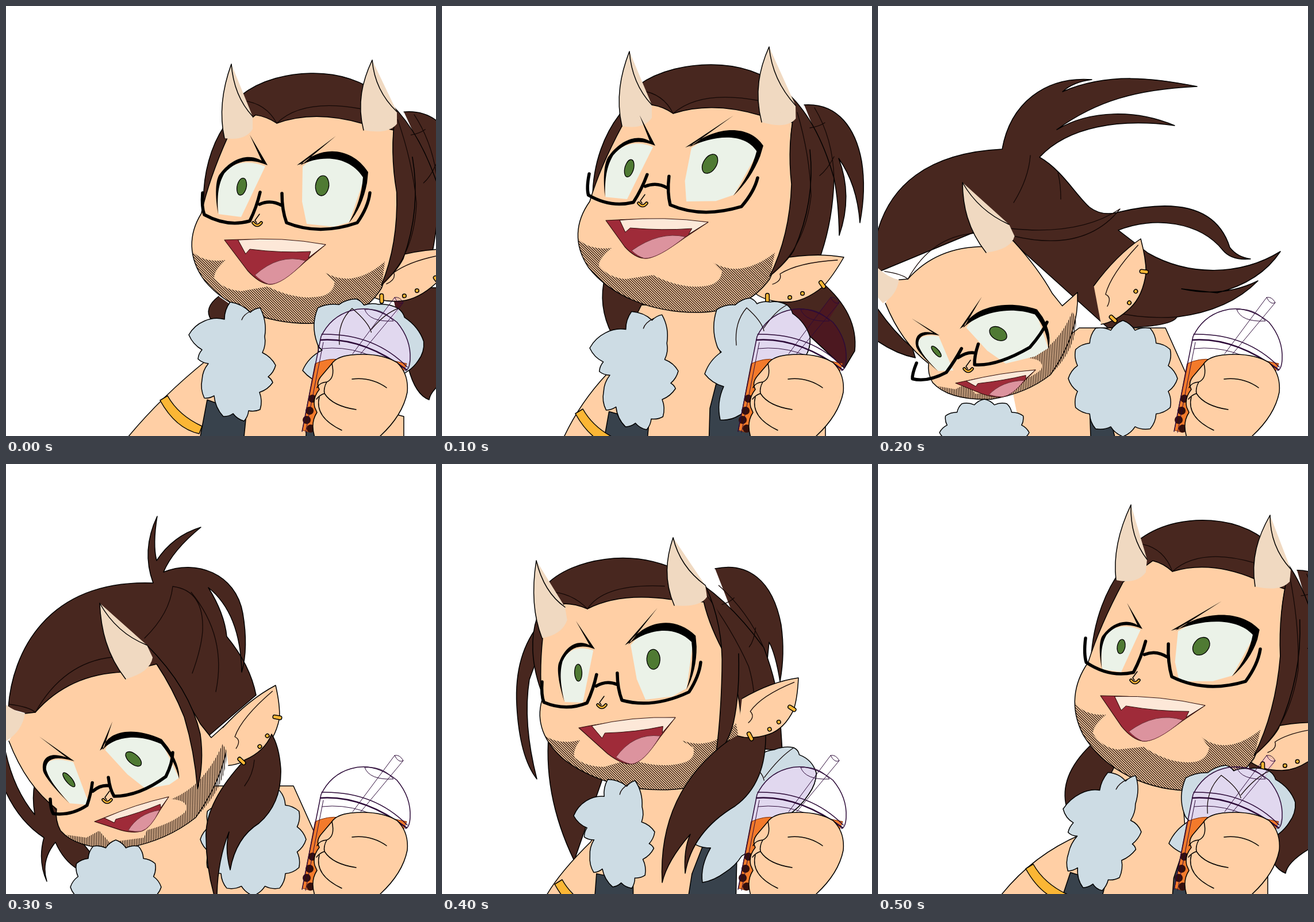
Animation, 748 px wide and 748 px high, one loop 0.6 s. Source, as an HTML page with a canvas:

```html
<!DOCTYPE html>
<html lang="en">
<head>
<meta charset="utf-8">
<title>Bubble tea</title>
<style>
html, body { margin: 0; width: 100%; height: 100%; overflow: hidden; background: #fff }
canvas { display: block; width: 100vw; height: 100vh }
</style>
</head>
<body>
<canvas width="748" height="748"></canvas>
<script>
const c = document.querySelector('canvas').getContext('2d');
const gold = '#fbb635', horn = '#f0d9c1', white = '#ebf2e8', green = '#4f7a33', tea = '#f37a2b';
const plain = { hair: '#48271f', skin: '#ffcfa5', fur: '#cddce4', vest: '#38424c' };
const tinted = { hair: '#4c1820', skin: '#fdc9c0', fur: '#e1d8ef', vest: '#30303f' };
let ink = plain;

// Every part is drawn once and placed in each pose by three anchor points.
const back = {
  head: [471, 204, 622, 216, 455, 488], ear: [686, 434, 786, 424, 688, 513],
  horns: [[392, 101, 380, 230, 429, 192], [637, 94, 622, 216, 680, 184]],
  left: [455, 277, 371, 293, 409, 367], right: [516, 278, 628, 293, 523, 379],
  glass: [342, 325, 633, 325, 488, 377], mouth: [380, 407, 556, 415, 457, 484], nose: [437, 379],
  collar: [318, 572, 469, 625, 414, 722], fur: [516, 634, 545, 715, 648, 519],
  arm: [212, 270, 680, 692], band: [0, 0], nape: [370, 505, 357, 546], low: [0, 0], tilt: -.8
};
const turn = {
  head: [402, 187, 556, 202, 367, 468], ear: [600, 438, 699, 437, 600, 515],
  horns: [[326, 79, 313, 209, 365, 172], [569, 71, 556, 202, 615, 173]],
  left: [371, 243, 289, 262, 322, 336], right: [434, 246, 556, 247, 425, 340],
  glass: [256, 292, 549, 299, 397, 346], mouth: [285, 373, 463, 376, 352, 439], nose: [349, 345],
  collar: [257, 595, 411, 635, 356, 737], fur: [457, 640, 484, 720, 570, 515],
  arm: [212, 240, 690, 667], band: [-36, 23], nape: [284, 470, 296, 572], tilt: -.8
};
const dive = {
  lean: [52, 475, 188, 429, 95, 655], ear: [385, 475, 457, 405, 439, 525],
  horns: [[147, 307, 188, 429, 228, 380]],
  left: [107, 573, 66, 592, 131, 634], right: [153, 559, 277, 531, 222, 622],
  glass: [67, 621, 294, 550, 168, 624], mouth: [135, 656, 274, 633, 216, 680], nose: [157, 633],
  ruffs: [[426, 648, 95, 101], [185, 742, 78, 58]], tilt: -.05, hair: flying
};
const land = {
  lean: [51, 432, 208, 374, 95, 638], ear: [388, 448, 469, 385, 443, 500],
  horns: [[163, 242, 208, 374, 245, 315]],
  left: [119, 517, 64, 533, 145, 593], right: [172, 497, 272, 482, 243, 565],
  glass: [77, 583, 290, 502, 188, 578], mouth: [154, 622, 283, 579, 235, 639], nose: [176, 586],
  ruffs: [[430, 653, 92, 98], [191, 736, 79, 82]], tilt: -.02, hair: falling, over: droop
};
const rise = {
  head: [253, 252, 404, 246, 326, 514], ear: [534, 402, 620, 372, 569, 470],
  horns: [[164, 168, 174, 303, 214, 249], [402, 128, 404, 246, 458, 211]],
  left: [266, 322, 203, 346, 245, 415], right: [328, 314, 440, 303, 354, 410],
  glass: [174, 379, 450, 345, 313, 411], mouth: [238, 459, 406, 441, 329, 522], nose: [278, 421],
  collar: [229, 612, 370, 640, 330, 738], fur: [432, 655, 453, 728, 578, 497],
  arm: [182, 205, 710, 650], band: [-72, 45], nape: [187, 455, 230, 690], tilt: -.8,
  hair: strand, over: locks
};
const top_ = {
  head: [512, 187, 657, 213, 462, 492], ear: [702, 455, 800, 453, 703, 533],
  horns: [[440, 71, 414, 202, 468, 166], [682, 89, 656, 213, 718, 183]],
  left: [460, 287, 390, 299, 423, 362], right: [522, 290, 661, 292, 524, 378],
  glass: [361, 303, 665, 322, 511, 370], mouth: [387, 403, 569, 420, 460, 482], nose: [447, 378],
  collar: [322, 600, 458, 640, 390, 742], fur: [506, 660, 535, 740, 645, 530],
  arm: [214, 270, 680, 678], band: [-11, 18], nape: [369, 490, 328, 597], low: [-27, 27], tilt: -.8
};
const poses = [back, turn, dive, land, rise, top_];

const basis = ([x, y, ax, ay, bx, by]) => new DOMMatrix([ax - x, ay - y, bx - x, by - y, x, y]);
const fit = (from, to) => basis(to).multiply(basis(from).inverse());
const shift = ([x, y]) => new DOMMatrix().translate(x, y);

function place(d, matrix) {
  const p = new Path2D();
  p.addPath(new Path2D(d), matrix);
  return p;
}

function draw(d, fill, matrix, line = '#000', width = 1.5) {
  const p = place(d, matrix);
  c.lineWidth = width;
  if (fill) { c.fillStyle = fill; c.fill(p); }
  if (line) { c.strokeStyle = line; c.stroke(p); }
}
const hair = (d, m) => draw(d, ink.hair, m);
const skin = (d, m) => draw(d, ink.skin, m);
const lines = (d, m) => draw(d, null, m, '#140806', 1.3);

function goldLine(d, m, width = 5) {
  draw(d, null, m, '#000', width + 3);
  draw(d, null, m, gold, width);
}

// Clockwise points joined by curves that bulge outwards.
function tufts(points, matrix) {
  const n = points.length;
  let d = `M${points[0]} ${points[1]}`;
  for (let i = 0; i < n; i += 2) {
    const x = points[i], y = points[i + 1], u = points[(i + 2) % n], v = points[(i + 3) % n];
    d += `Q${(x + u) / 2 + (v - y) * .17} ${(y + v) / 2 - (u - x) * .17} ${u} ${v}`;
  }
  draw(d, ink.fur, matrix);
}

function ruff([x, y, rx, ry]) {
  const points = [];
  for (let i = 0; i < 24; i++) {
    const a = (i - 6) * Math.PI / 12, k = i % 2 ? .86 : 1;
    points.push(x + rx * k * Math.cos(a), y + ry * k * Math.sin(a));
  }
  tufts(points);
}

function stubble(d, matrix, angle) {
  c.save();
  c.clip(place(d, matrix));
  c.translate(374, 374);
  c.rotate(angle);
  let rows = '';
  for (let x = -600; x < 600; x += 3) rows += `M${x} -600V600`;
  draw(rows, null, undefined, '#20130c', 1.3);
  c.restore();
}

function ear(p) {
  const m = fit(turn.ear, p.ear);
  skin('M585 440Q650 428 699 437Q680 470 663 488Q630 515 600 515Q565 515 545 500', m);
  lines('M575 484Q592 478 588 466Q620 446 688 442', m);
  return m;
}
const rings = m => goldLine('M566 503v10M605 507h.1M627 500h.1M659 481l5 7', m);

function upright(p) {
  const m = fit(turn.head, p.head), l = fit(back.collar, p.collar), r = fit(turn.fur, p.fur);
  const [x, y] = p.collar, [u, v] = p.fur, [ax, ay, tx, ty] = p.nape, [foot, bx, by, edge] = p.arm;
  if (p.hair) p.hair();
  else hair('M630 172C690 168 720 215 730 270Q738 320 727 377Q722 310 690 265Q715 330 691 399Q690 340 682 300', m);
  hair('M262 335C262 270 285 220 308 190L341 138C380 110 430 102 468 102C560 102 640 150 682 300Q680 370 660 430L640 490L300 400', m);
  hair(`M${ax} ${ay}Q${Math.min(ax, tx) - 14} ${(ay + ty) / 2} ${tx} ${ty}L${ax + 100} ${ay + 70}`);
  if (p.low) hair('M670 490H800V630Q740 660 736 685Q712 676 700 630', shift(p.low));
  else if (!p.over) hair('M660 480Q725 535 718 600L700 630L560 500');

  skin(`M${foot} 750Q${bx} ${by} ${x + 30} ${y + 45}L${x + 90} ${y - 75}H${u + 20}L${u + 30} ${v}V750`);
  skin(`M540 750L600 690L${edge} 714V750`);
  draw('M334 770L350 685L418 710L412 770', ink.vest, l);
  draw('M480 645L466 700L464 770H540L530 660', ink.vest, r);
  draw('M268 686L281 678Q300 712 341 731L336 744Q295 735 268 686', gold, shift(p.band));

  const e = p.over ? null : ear(p);
  skin('M313 209L365 172Q385 175 402 187Q470 165 553 190L610 203Q602 250 610 310Q610 390 570 475Q530 530 450 533C360 535 290 500 255 455C228 415 232 375 257 340Q275 280 313 209', m);
  stubble('M237 405Q255 425 295 421Q272 440 273 452Q290 473 320 475L367 468Q420 495 465 486Q485 480 487 462L471 446Q520 475 579 429L570 475Q530 530 450 533C360 535 290 500 255 455Q238 430 237 405', m, p.tilt);
  if (e) {
    hair('M615 173Q600 240 608 310Q605 400 570 470Q600 445 612 425Q650 340 640 250', m);
    rings(e);
  }
  lines('M402 187Q385 152 345 147M402 187Q450 145 553 165M618 185Q640 260 642 330Q632 420 572 468M640 212Q655 210 666 203M657 295Q670 285 682 262M648 177Q680 230 682 300', m);
  tufts([380, 545, 390, 515, 425, 533, 442, 525, 450, 575, 446, 603, 469, 625, 456, 645, 464, 655, 441, 672, 442, 702,
    422, 704, 414, 722, 395, 709, 378, 714, 362, 678, 345, 682, 341, 650, 352, 622, 334, 614, 341, 598, 318, 572, 345, 548], l);
  lines('M410 546Q413 536 428 530', l);
  tufts([478, 528, 510, 520, 536, 508, 548, 518, 570, 515, 600, 520, 610, 535, 640, 575, 632, 610, 600, 640,
    540, 690, 517, 712, 484, 720, 490, 662, 457, 640, 486, 602, 478, 590], r);
  lines('M512 590Q508 550 530 525Q556 548 560 565M560 560Q580 530 600 520', r);
  if (p.over) {
    p.over();
    rings(ear(p));
  }
}

function strand() {
  hair('M172 275Q125 330 130 420Q135 510 165 548Q140 450 152 375L175 312');
  hair('M475 182C530 170 575 200 590 280Q597 330 588 378Q580 330 569 310L560 400');
}

function locks() {
  hair('M458 211Q490 280 487 360Q485 450 475 515Q500 480 507 450Q518 400 516 330');
  hair('M500 480Q375 570 383 728Q392 690 432 644Q420 670 423 712Q435 640 510 595Q565 555 563 467L518 470');
}

function leaning(p) {
  const m = fit(land.lean, p.lean);
  p.hair();
  skin('M230 650L350 560H500L545 660V750H250');
  if (p == dive) draw('M368 695L370 750H412L400 700', ink.vest);
  skin('M33 434L51 432Q110 365 205 362L262 348Q310 400 338 452L357 476L388 448Q390 530 330 615Q280 655 210 668C140 672 110 655 95 638Q85 620 88 600Q35 560 5 482', m);
  stubble('M377 487Q345 560 288 583Q320 585 312 605Q290 625 245 637L240 650L180 658L162 638L140 650L105 645Q140 675 210 668Q280 655 330 615Q385 560 384 500', m, p.tilt);
  lines('M51 432Q40 422 5 418M51 432Q100 345 185 336', m);
  draw('M-10 410Q10 430 33 434Q28 465 0 482L-10 470', horn, m, null);
  if (p == land) hair('M245 315Q320 390 338 470Q345 520 333 565Q328 500 310 440Q290 390 262 348');
  const e = ear(p);
  p.ruffs.forEach(ruff);
  if (p.over) p.over();
  rings(e);
}

function flying() {
  hair('M-5 410C15 310 90 255 216 249C230 170 290 122 372 128Q340 132 321 149C400 115 480 125 555 140C450 145 380 165 311 215C370 180 450 180 516 208C420 195 330 210 281 263C320 285 345 330 368 350Q390 367 421 358C520 335 590 350 612 420Q625 437 648 440Q615 443 600 425C560 375 480 365 418 390L470 430C540 470 630 470 700 427Q665 480 590 499L528 492Q600 508 661 478Q610 530 520 541Q510 560 400 560L200 380L-5 465');
  hair('M-5 520Q25 565 60 595L65 612Q30 605 -5 580');
  lines('M265 260Q262 300 236 342M313 290Q318 310 318 336M421 353Q350 400 230 387M421 353Q360 430 235 400M410 532Q460 545 520 541');
}

function falling() {
  hair('M4 425C10 330 70 200 256 207Q235 150 263 91Q255 140 262 168Q290 125 339 110Q290 150 274 188C330 165 400 190 412 260Q422 320 410 362Q408 260 352 215Q380 260 384 300Q425 350 435 402L350 475L40 435');
  hair('M-5 478Q8 560 50 610Q45 580 50 555L150 680L125 705Q100 690 86 658Q60 690 71 726Q55 690 66 650Q20 620 -5 560');
  lines('M290 213Q285 260 241 303M290 213Q345 220 342 290Q340 320 324 364M322 223Q385 300 365 396');
}

function droop() {
  hair('M415 515Q345 590 348 650Q348 700 362 750H367Q368 690 388 640Q380 670 390 706Q400 650 440 625Q480 590 478 530Q475 490 462 470Q450 500 415 515');
  lines('M432 515Q430 540 415 560');
}

function features(p) {
  for (const h of p.horns) {
    const m = fit(back.horns[1], h);
    draw('M622 216Q665 224 680 205V184L637 94', horn, m, null);
    draw('M622 216C610 170 620 130 637 94C640 130 655 160 680 184', horn, m);
  }
  const l = fit(back.left, p.left), r = fit(back.right, p.right);
  draw('M370 362C366 330 370 300 380 288Q410 262 451 279L409 367', white, l, null);
  draw('M369 362C362 320 366 298 373 291C395 262 430 252 455 277C425 264 400 268 380 291C369 310 367 330 369 362M424 224L455 277L447 274', '#000', l, null);
  draw('M407.8 329a8 15 12 1 1 .1 0', green, l, '#000', 1.3);
  draw('M516 279L515 340L523 379L570 384L597 376L626 292Q570 235 516 279', white, r, null);
  draw('M512 277C545 243 600 243 630 289L628 308Q620 350 596 378Q618 340 621 298C595 258 545 260 512 277M574 226L506 277L518 273', '#000', r, null);
  draw('M548.6 330a11.5 17.5 8 1 1 .1 0', green, r, '#000', 1.3);

  const m = fit(back.mouth, p.mouth);
  draw('M380 407Q470 403 556 415L520 445Q475 487 457 484Q440 482 420 460Z', '#9f2b39', m, '#30100c', 1.2);
  draw('M433 468Q475 430 521 443Q480 486 457 484Q445 480 433 468', '#dc939e', m, '#6c3038', 1);
  draw('M404 407Q480 401 556 415L526 438L530 427Q480 430 424 423L417 431Z', '#fde8d8', m, '#30100c', 1);

  const nose = shift(p.nose);
  draw('M4 -17l-8 11l3 4', null, nose);
  goldLine('M-7 -2q7 9 14 0', nose, 2.5);
  draw('M342 325Q340 350 345 363Q385 385 424 374Q436 350 442 324M441 345Q460 336 480 347M480 326Q480 355 488 377Q545 400 611 377Q630 350 633 325',
    null, fit(back.glass, p.glass), '#000', 5.5);
}

const cup = 'M515 740L548 575Q565 540 600 530Q640 518 680 550Q705 580 703 615L695 634L680 640H560ZM676 507L691 516L670 550L646 545Z';

function drink() {
  const edge = '#2c0a38';
  draw('M538 622Q560 612 580 615L550 690L530 742L516 738ZM672 617L697 622L690 640Z', tea, undefined, '#7a2c08', 1);
  draw('M533 683h.1M528 704h.1M523 720h.1M530 735h.1', null, undefined, '#35100c', 14);
  draw('M603 605L676 507Q685 505 691 516L617 605M691 516Q683 521 676 507M624 528Q632 550 674 548Q655 525 624 528M552 585L521 742M550 596Q620 588 690 640', null, undefined, edge, 1);
  draw('M515 740L548 575Q565 540 600 530Q640 518 680 550Q705 580 703 615Q702 632 695 634M549 571Q640 569 698 628', null, undefined, edge);
  draw('M547 581Q620 576 697 633', null, undefined, edge, 2.5);
}

function hand() {
  draw('M651 748Q690 712 698 672Q701 640 680 620Q650 602 600 607Q575 610 567 622L550 642Q538 655 545 667Q533 682 537 698L541 707Q529 725 537 750', plain.skin);
  draw('M567 622Q573 648 558 654Q545 655 541 664M558 654Q552 665 554 674Q568 696 609 702M554 674Q545 677 540 684M545 680Q536 715 584 738M602 649Q635 645 662 664', null);
}

function scene(p) {
  const person = p.head ? upright : leaning;
  c.fillStyle = '#fff';
  c.fillRect(0, 0, 748, 748);
  person(p);
  features(p);
  c.save();
  c.clip(new Path2D(cup));
  ink = tinted;
  person(p);
  ink = plain;
  c.restore();
  drink();
  hand();
}

c.lineCap = c.lineJoin = 'round';
let shown;
function tick() {
  const p = poses[Math.floor(performance.now() / 100) % poses.length];
  if (p != shown) scene(shown = p);
  requestAnimationFrame(tick);
}
tick();
</script>
</body>
</html>
```
